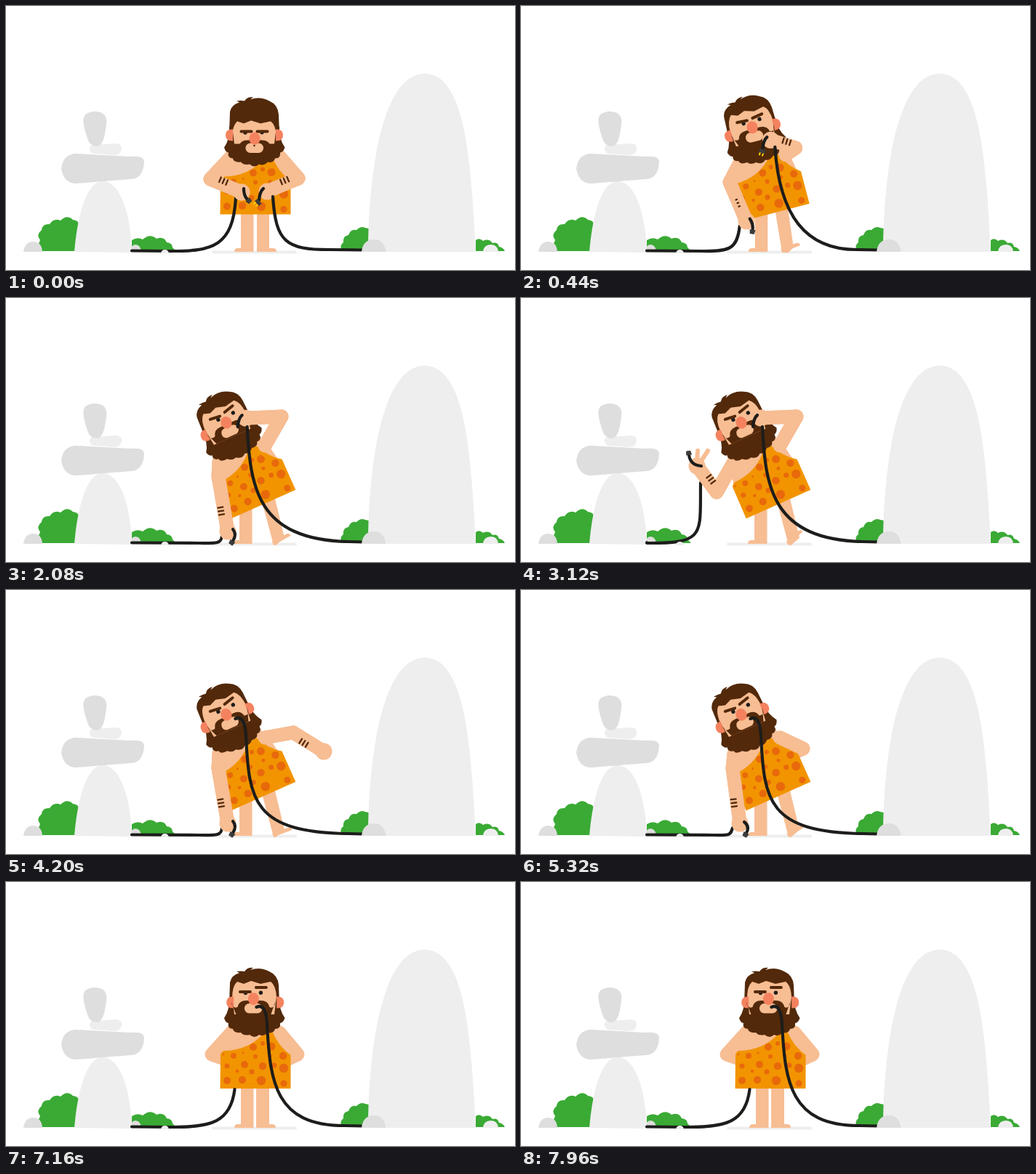
These frames come from a looping animation (700x363 px, 8000 ms). An HTML page:

```html
<!DOCTYPE html>
<html lang="en">
<head>
<meta charset="utf-8">
<title>Caveman and cables</title>
<style>
html, body { margin: 0; width: 100%; height: 100%; overflow: hidden; background: #fff; }
svg { display: block; width: 100vw; height: 100vh; }
.skin { fill: #f7bd93; }
.hair { fill: #52290a; }
.pink { fill: #f4825f; }
.light { fill: #eee; }
.grey { fill: #dedede; }
.green { fill: #3aaa35; }
.line { fill: none; stroke-linecap: round; stroke-linejoin: round; }
.arm { stroke: #f7bd93; stroke-width: 19; }
.finger { stroke: #f7bd93; stroke-width: 6; }
.cable { stroke: #1d1d1b; stroke-width: 4.2; }
.tattoo { stroke: #52290a; stroke-width: 2.3; }
.brow { stroke: #52290a; stroke-width: 4; }
</style>
</head>
<body>
<svg viewBox="0 0 700 363">
  <defs>
    <path id="cloth" d="M294.500,284L295,237Q297,232 301,232Q335,231 355,207H367Q375,226 391.500,238V284Z"/>
    <clipPath id="clip"><use href="#cloth"/></clipPath>
  </defs>

  <g class="green">
    <path d="M46,337Q43,329 47,322Q41,314 49,308Q50,299 60,300Q66,291 75,295Q84,286 92,294Q100,295 100,300L96,337Z"/>
    <path d="M173,337V322Q181,317 188,321Q198,312 207,320Q217,316 221,325Q229,326 229,332L234,337Z"/>
    <path d="M462,337Q458,329 464,325Q463,316 471,315Q474,306 482,308Q488,302 494,305L499,306V337Z"/>
    <path d="M646,322Q651,318 656,323Q664,319 669,326Q676,324 678,331Q684,332 686,337H646Z"/>
  </g>
  <path class="grey" d="M170,338Q172,328 178,328Q185,328 186,338Z"/>
  <path class="light" d="M498,338C498,240 515,93 576,93C637,93 640,240 646,338Z"/>
  <path class="light" d="M656,338Q657,328 667,328Q676,328 677,338Z"/>
  <path class="light" d="M94,338C98,290 110,241 133,241C158,241 172,290 173,339Z"/>
  <path class="light" d="M118,191L152,189Q160,190 159,197Q157,205 150,205L119,203Q111,196 118,191Z"/>
  <path class="grey" d="M96,203L170,207Q190,205 190,214Q189,237 172,238L98,244Q80,245 76,224Q78,204 96,203Z"/>
  <path class="grey" d="M113,147Q121,143 132,147Q140,152 138,163C136,178 134,192 125,193Q115,193 112,182C108,170 105,158 107,153Q109,148 113,147Z"/>
  <path class="grey" d="M24,338Q26,324 37.500,324Q49,324 50,338Z"/>

  <rect class="light" x="283" y="336.500" width="117" height="4" rx="2"/>
  <path id="legs" class="skin"/>
  <path id="foot" class="skin" d="M0,0H27Q27,-5 22,-5H0Z"/>

  <path id="backL" class="line arm"/>
  <path id="backR" class="line arm"/>
  <g id="body">
    <path class="skin" d="M308,196Q299,215 297,245H388L382,210L374,195Z"/>
    <use href="#cloth" fill="#f29400"/>
    <g id="spots" fill="#e8690b" clip-path="url(#clip)"></g>
  </g>
  <path id="upperL" class="line arm"/>
  <path id="upperR" class="line arm"/>

  <g id="head">
    <path class="hair" d="M307,168L308,138Q310,128 321,125L317,123Q323,122 328,123Q332,117 340,118L336,121Q349,116 362,123Q374,128 375,142L376,168Z"/>
    <path id="face" class="skin" d="M311,160Q311,143 318,137L327,140L337,136L350,140L364,137Q371,142 372,158V184H311Z"/>
    <path class="hair" d="M307,158H311L314,182H369L372,158H376Q375,175 383.500,187Q381,194 377,194Q378,202 370,202Q368,209 360,207Q354,213 348,210Q342,216 335,210Q327,212 323,207Q313,208 312,202Q304,201 306,194Q302,194 300,187Q308,176 307,158Z"/>
    <g id="ears" class="pink">
      <path d="M312,157.500Q302,157 302,165.500Q302,174 312,173.500Z"/>
      <path d="M371,157.500Q381,157 381,165.500Q381,174 371,173.500Z"/>
    </g>
    <g id="features">
      <path class="hair" d="M311,164Q313,175 320,172Q322,163 332,163H352Q362,163 364,172Q371,175 372,164L366,182H318Z"/>
      <rect class="skin" x="329.500" y="167" width="24.500" height="13.500" rx="6.500"/>
      <circle id="dot" cx="341.500" cy="170.500" r="1.200" fill="#3a1b06"/>
      <ellipse id="tongue" cx="332" cy="167.500" rx="4.500" ry="3" fill="#e30613"/>
      <circle id="eyeL" cy="152.600" r="2.700" fill="#1d1d1b"/>
      <circle id="eyeR" cy="152.300" r="2.700" fill="#1d1d1b"/>
      <path id="browL" class="line brow" d="M-7,0H7"/>
      <path id="browR" class="line brow" d="M-7,0H7"/>
      <ellipse class="pink" cx="342" cy="160.800" rx="7.500" ry="8.500"/>
    </g>
  </g>

  <path id="cableL" class="line cable"/>
  <path id="foreL" class="line arm"/>
  <path id="foreR" class="line arm"/>
  <g class="skin">
    <circle id="handL" r="11.500"/>
    <circle id="handR" r="11.500"/>
  </g>
  <path id="fingers" class="line finger"/>
  <path id="inkL" class="line tattoo"/>
  <path id="inkR" class="line tattoo"/>
  <path id="cableR" class="line cable"/>
  <path id="tipL" class="line cable"/>
  <path id="tipR" class="line cable"/>
  <path id="plugL" d="M-4,0H4L3,6H-3Z" fill="#3c3c3b"/>
  <g id="plugR">
    <path d="M-4.500,-1H4.500V4H-4.500Z" fill="#3c3c3b"/>
    <path d="M-2.200,4V8M2.200,4V8" stroke="#f7d200" stroke-width="2"/>
  </g>

  <path class="light" d="M213,340Q214,335 218.500,335Q223,335 224,340Z"/>
  <path class="grey" d="M489,338Q491,321 506,321Q520,321 522.500,338Z"/>
</svg>
<script>
const LOOP = 8000;
const el = {};
document.querySelectorAll('[id]').forEach(n => el[n.id] = n);
const set = (id, name, value) => el[id].setAttribute(name, value);
const show = (id, on) => set(id, 'visibility', on ? 'visible' : 'hidden');
const move = (id, x, y, turn = 0) => set(id, 'transform', `translate(${x} ${y}) rotate(${turn})`);
const mix = (a, b, k) => a + (b - a) * k;
const ease = k => k < .5 ? 4 * k * k * k : 1 - 4 * (1 - k) ** 3;

// keys: [time, values], eased from one to the next
function track(keys, t) {
  const i = keys.findIndex(k => k[0] > t);
  if (i < 0) return keys[keys.length - 1][1];
  if (i === 0) return keys[0][1];
  const [t0, a] = keys[i - 1], [t1, b] = keys[i];
  const k = ease((t - t0) / (t1 - t0));
  return a.map((v, j) => mix(v, b[j], k));
}
const value = (t, ...keys) => track(keys.map(([time, v]) => [time, [v]]), t)[0];

// left: elbow, hand, cable curve, tip relative to the hand
const left = {
  hold: [281, 238, 324, 256, 225, 285, 312, 330, 316, 264, 3, -5, 3, 5, 8, 10],
  down: [291, 245, 301, 321, 265, 288, 288, 337, 291, 327, 6, -2, 14, 4, 9, 13],
  sway: [292, 245, 305, 321, 265, 292, 296, 337, 297, 327, 7, -3, 13, 4, 7, 13],
  lift: [269, 267, 242, 231, 174, 255, 246, 325, 247, 254, 6, 0, -9, -1, -11, -15],
  rest: [283, 237, 300, 243, 225, 283, 309, 330, 314.5, 285, 3, -5, 3, 5, 8, 10]
};
// right: elbow, hand, cable curve
const right = {
  hold: [402, 237, 359, 255, 445, 385, 335, 371, 325, 367, 262],
  high: [354, 154, 328, 115, 478, 400, 335, 340, 255, 332, 127],
  mouth: [379, 163, 330, 165, 470, 345, 332, 336, 260, 332, 177],
  swing: [398, 160, 430, 120, 470, 340, 333, 334, 290, 330, 200],
  out: [395, 196, 437, 222, 470, 340, 333, 334, 290, 330, 200],
  back: [388, 218, 366, 228, 470, 340, 333, 334, 290, 330, 200],
  rest: [401, 237, 388, 243, 465, 370, 335, 363, 275, 361, 195]
};
const seq = (poses, list) => list.map(([time, name]) => [time, poses[name]]);
const leftKeys = seq(left, [[160, 'hold'], [680, 'down'], [1400, 'down'], [2050, 'sway'], [2560, 'down'],
  [2860, 'lift'], [3380, 'lift'], [3720, 'sway'], [4280, 'sway'], [4800, 'down'], [5920, 'down'], [6280, 'rest']]);
const rightKeys = seq(right, [[160, 'hold'], [720, 'high'], [1360, 'high'], [1660, 'mouth'], [3420, 'mouth'],
  [3660, 'swing'], [3940, 'out'], [4280, 'out'], [4680, 'back'], [5920, 'back'], [6280, 'rest']]);

const spots = [[304, 253, 3.5], [313, 239, 4], [304, 273, 5], [325, 272, 5.2], [328, 251, 5], [340, 227, 5],
  [353, 222, 3], [343, 240, 3], [338, 261, 3.6], [318, 260, 2.2], [326, 235, 1.5], [351, 273, 6.3], [353, 253, 5.2],
  [365, 226, 5.5], [369, 252, 3.5], [382, 256, 6.2], [381, 239, 5.2], [382, 277, 4.6], [363, 239, 2.5], [299, 237, 1.5]];
el.spots.innerHTML = spots.map(([x, y, r]) => `<circle cx="${x}" cy="${y}" r="${r}"/>`).join('');

function tattoo(id, ex, ey, hx, hy, at, side) {
  const len = Math.hypot(hx - ex, hy - ey) || 1;
  const ux = (hx - ex) / len, uy = (hy - ey) / len, nx = uy * side, ny = -ux * side;
  let d = '';
  for (const s of [-5, 0, 5]) {
    const x = mix(ex, hx, at) + ux * s, y = mix(ey, hy, at) + uy * s;
    d += `M${x + nx},${y + ny}L${x + nx * 8},${y + ny * 8}`;
  }
  set(id, 'd', d);
}

function arm(side, sx, sy, ex, ey, hx, hy, upper, fore) {
  set('back' + side, 'd', `M${sx},${sy}L${ex},${ey}L${hx},${hy}`);
  set('upper' + side, 'd', `M${sx},${sy}L${ex},${ey}`);
  set('fore' + side, 'd', `M${ex},${ey}L${hx},${hy}`);
  move('hand' + side, hx, hy);
  show('upper' + side, upper);
  show('fore' + side, fore);
  show('hand' + side, fore);
}

function draw(t) {
  const lean = value(t, [160, 0], [680, 1], [5920, 1], [6280, 0]);
  const look = value(t, [160, 1], [560, 0]);
  const peek = value(t, [6860, 0], [7060, 1]);
  const lift = value(t, [2600, 0], [2860, 1], [3380, 1], [3600, 0]);
  const front = t < 6080;

  const pose = `translate(${343 + 11 * lean} ${284 + 2.5 * look - .5 * lean}) rotate(${-24 * lean}) translate(-343 -284)`;
  set('body', 'transform', pose);
  set('head', 'transform', `${pose} translate(0 ${5 * look})`);
  move('face', 0, 14 * look);
  move('ears', peek * 1.2, 4.5 * look);
  move('features', -1.6 * peek, 14 * look);

  set('eyeL', 'cx', mix(329, 333.5, lean) + peek * 2);
  set('eyeR', 'cx', mix(352, 356, lean));
  move('browL', 330.5, mix(151, 148.5, lean), 6 * lean);
  move('browR', 352.5, mix(151, 145, Math.max(lean, peek)), -15 * lean);
  show('dot', look > .5);
  show('tongue', t > 600 && t < 1620);

  // legs and tapping foot
  const lx = 323 - 2 * lean, m = (a, b) => mix(a, b, lean);
  const heel = m(345 - peek, 368);
  set('legs', 'd', `M${lx},280H${lx + 17.5}V338H${lx - 9}Q${lx - 9},333 ${lx - 4},333H${lx}Z`
    + `M${m(345 - peek, 352)},280L${m(362, 370)},${m(280, 276)}L${m(362, 383)},${m(335, 330)}L${heel + m(17, 3)},${m(338, 340)}L${heel},${m(338, 339.5)}Z`);
  const tap = 29 + 14 * Math.cos((t - 1280) / 460 * 2 * Math.PI);
  move('foot', heel, m(338, 339.5), -tap * lean);

  // left arm and cable
  const [ex, ey, hx, hy, a, b, cx, cy, x, y, ...tip] = track(leftKeys, t);
  arm('L', m(311, 293), m(206, 225), ex, ey, hx, hy, front, front);
  set('cableL', 'd', `M173,336.5L${a},337C${b},337.5 ${cx},${cy} ${x},${y}`);
  const p = tip.map((v, i) => v + (i % 2 ? hy : hx));
  set('tipL', 'd', `M${p[0]},${p[1]}Q${p[2]},${p[3]} ${p[4]},${p[5]}`);
  move('plugL', p[4], p[5], Math.atan2(p[5] - p[3], p[4] - p[2]) * 180 / Math.PI - 90);
  show('tipL', front);
  show('plugL', front);
  set('fingers', 'd', `M${hx},${hy - 5}L${hx + 1},${hy - 21}M${hx + 4},${hy - 4}L${hx + 15},${hy - 21}`);
  show('fingers', lift > .6);
  tattoo('inkL', ex, ey, hx, hy, m(.38, .62) - .2 * lift, 1 - 2 * lean);
  show('inkL', front);

  // right arm and cable
  const r = track(rightKeys, t).slice();
  const inMouth = t >= 3440;
  if (t > 1660 && t < 2520) {
    const push = 2.5 * Math.sin((t - 1660) / 215 * Math.PI);
    r[2] += push; r[3] -= push / 2; r[9] += push; r[10] -= push / 2;
  }
  r[9] -= 2 * peek;
  const [fx, fy, gx, gy, q0, q1, q2, q3, q4, q5, q6] = r;
  arm('R', m(376, 356), m(207, 203), fx, fy, gx, gy, front, t < 4480);
  set('cableR', 'd', `M490,335.5L${q0},335C${q1},${q2} ${q3},${q4} ${q5},${q6}`
    + (inMouth ? `c-1,-19 -6,-27 -14.5,-23` : ''));
  set('tipR', 'd', `M${gx - 5},${gy - 4}q-5,4 -6,16`);
  move('plugR', gx - 11, gy + 14, 50 * (1 - lean));
  show('tipR', !inMouth);
  show('plugR', t < 1620);
  tattoo('inkR', fx, fy, gx, gy, .4, -1);
  show('inkR', t < 480 || (t > 3600 && t < 4480));
}

const start = performance.now();
function frame() {
  draw((performance.now() - start) % LOOP);
  requestAnimationFrame(frame);
}
frame();
</script>
</body>
</html>
```
